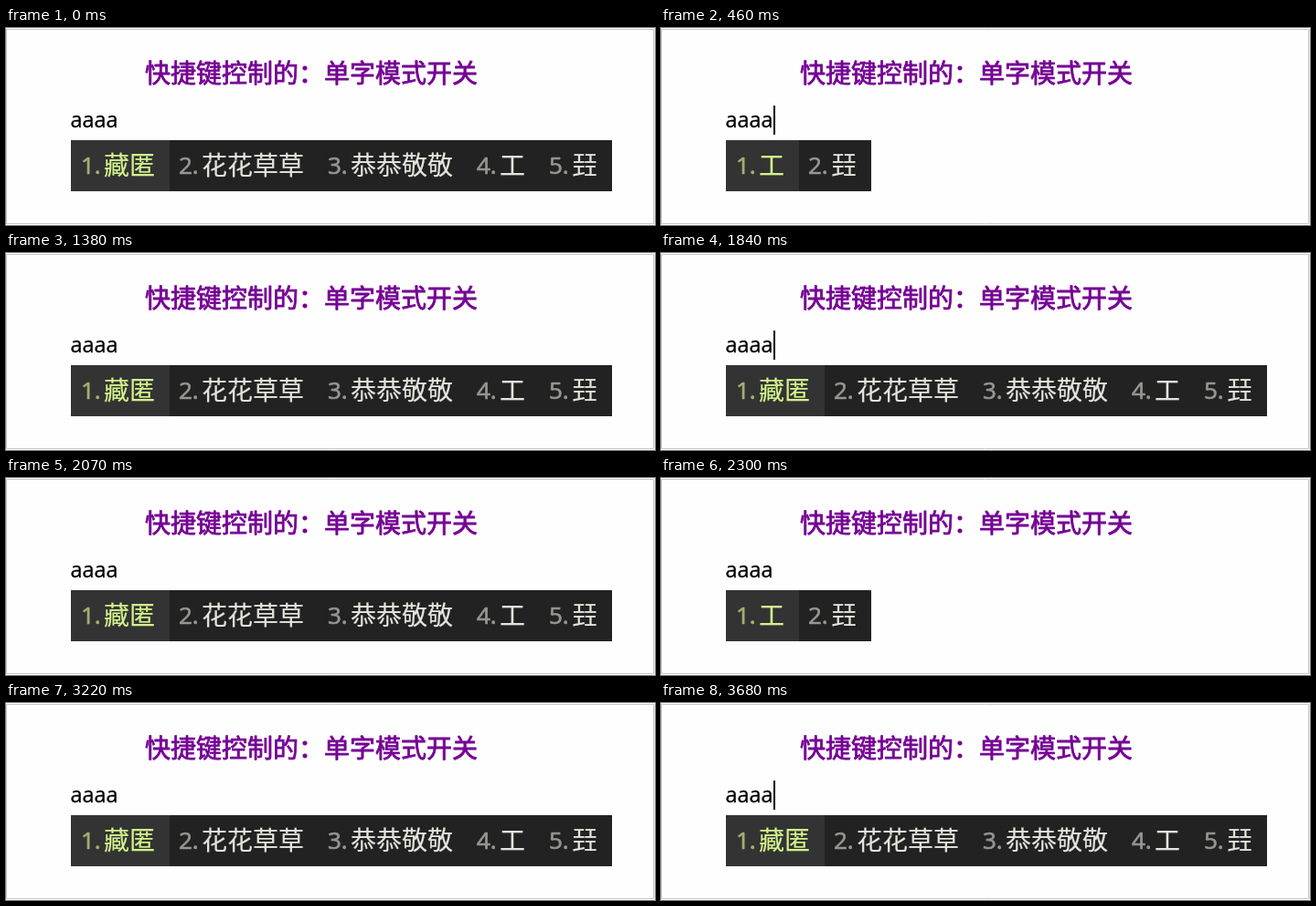
Recreate the animation shown at these times as an HTML page with a canvas. Size 710 px wide and 216 px high, loop 3.84 s.

```html
<!DOCTYPE html>
<html lang="zh-CN">
<head>
<meta charset="utf-8">
<title>单字模式开关</title>
<style>
  html, body { margin: 0; width: 100%; height: 100%; overflow: hidden; background: #fff; }
  canvas { display: block; }
</style>
</head>
<body>
<canvas id="stage" width="710" height="216"></canvas>
<script>
const ctx = document.getElementById('stage').getContext('2d');
const LOOP = 3840;
const HAN = '"Noto Sans CJK SC", "Noto Sans CJK", sans-serif';
const LATIN = '"Open Sans", "Noto Sans", sans-serif';

const PHRASES = ['藏匿', '花花草草', '恭恭敬敬', '工', '㠭'];
const SINGLES = PHRASES.filter(word => word.length === 1);

// Time spans, in ms, with the single-character list and with the caret.
const SINGLE_SPANS = [[460, 1380], [2300, 3220]];
const CARET_SPANS = [[460, 690], [1150, 1380], [1610, 2070], [2760, 3220], [3680, LOOP]];

const within = (spans, t) => spans.some(([from, to]) => t >= from && t < to);

function rect(x, y, w, h, color) {
  ctx.fillStyle = color;
  ctx.fillRect(x, y, w, h);
}

// "extra" thickens the strokes of the letters by that many pixels.
function text(str, x, y, font, color, extra) {
  ctx.font = font;
  ctx.fillStyle = ctx.strokeStyle = color;
  ctx.lineWidth = extra;
  ctx.lineJoin = 'round';
  ctx.fillText(str, x, y);
  ctx.strokeText(str, x, y);
}

function drawPage() {
  rect(0, 0, 710, 216, '#ffffff');
  rect(709, 1, 1, 214, '#e4e4e4');
  ctx.strokeStyle = '#c8c8c8';
  ctx.lineWidth = 1;
  ctx.strokeRect(0.5, 1.5, 708, 213);
  rect(1, 2, 707, 212, '#fefefe');
  text('快捷键控制的：单字模式开关', 152, 60, `28px ${HAN}`, '#750094', 0.8);
  text('aaaa', 70.5, 109, `23.4px ${LATIN}`, '#000', 0.3);
}

function drawCandidates(words) {
  const left = 71, top = 123, height = 56, em = 28;
  const lead = 36, trail = 16, gap = 51, baseline = 161;
  let x = left + lead;
  const cells = words.map(word => {
    const cell = { word, x, end: x + word.length * em };
    x = cell.end + gap;
    return cell;
  });
  rect(left, top, cells.at(-1).end + trail - left, height, '#222222');
  rect(left, top, cells[0].end + trail - left, height, '#333333');
  cells.forEach((cell, i) => {
    text(`${i + 1}.`, cell.x - 25, baseline - 1, `26px ${LATIN}`, i ? '#969693' : '#a3b070', 0.7);
    text(cell.word, cell.x, baseline, `${em}px ${HAN}`, i ? '#e4e4dc' : '#d3f28c', 0.2);
  });
}

function frame(now) {
  const t = now % LOOP;
  drawPage();
  drawCandidates(within(SINGLE_SPANS, t) ? SINGLES : PHRASES);
  if (within(CARET_SPANS, t)) rect(123, 85, 2, 32, '#000');
  requestAnimationFrame(frame);
}
requestAnimationFrame(frame);
</script>
</body>
</html>
```
